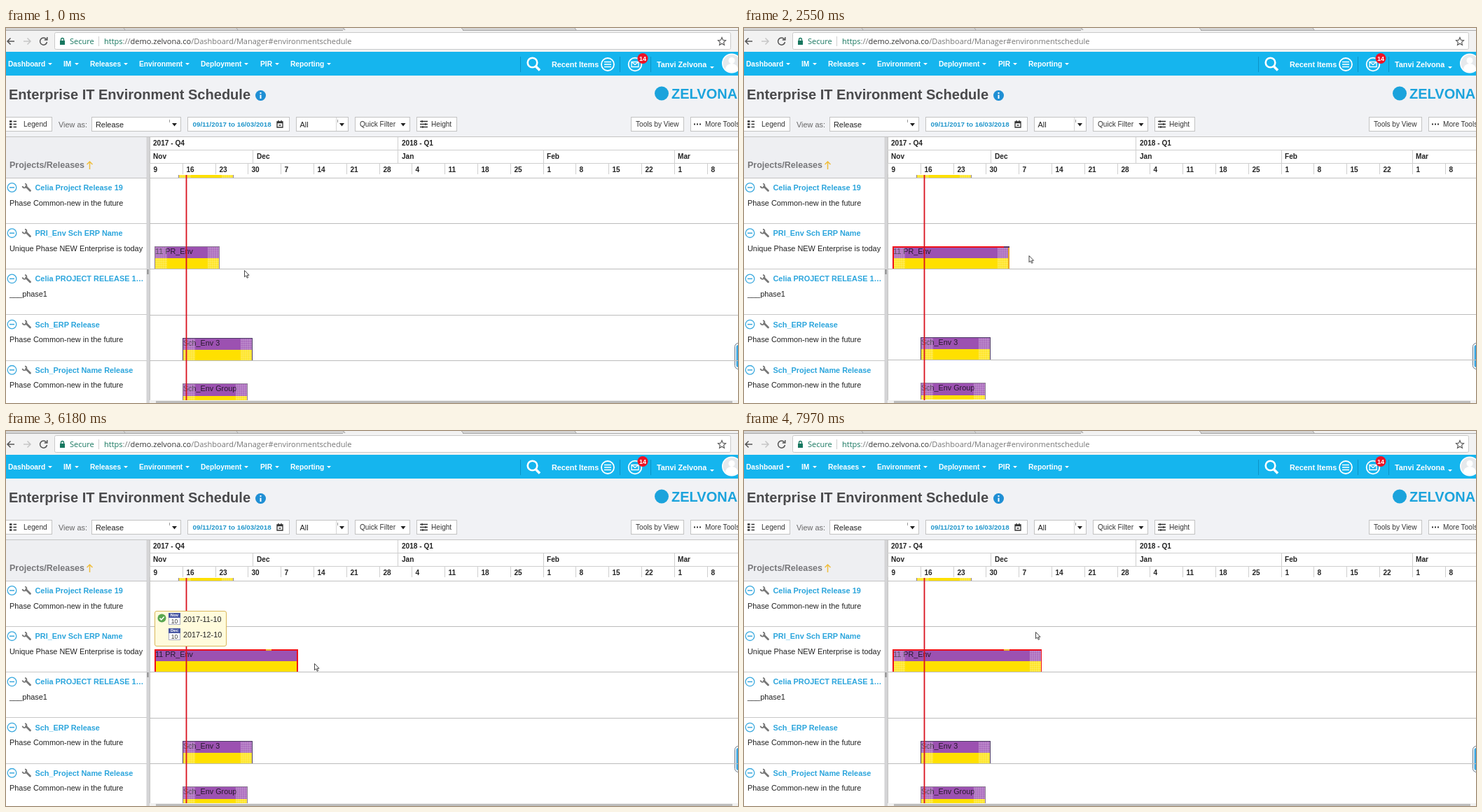
Write an HTML page that moves like this. It is 1045x536 px and loops after 8000 ms.

```html
<!DOCTYPE html>
<html lang="en">
<head>
<meta charset="utf-8">
<title>Environment Schedule</title>
<style>
html, body { margin: 0; width: 100%; height: 100%; overflow: hidden; background: #fff; }
body, text { font-family: "Liberation Sans", Arial, sans-serif; }
svg { position: absolute; left: 0; top: 0; overflow: visible; }
div, i, b { position: absolute; box-sizing: border-box; font-style: normal; }
.os { font: 11px "Open Sans", sans-serif; }
.t { font-size: 10.1px; fill: #333; }
.m { font-size: 10.9px; fill: #222; }
.bold { font-weight: bold; }
.nav { font-size: 10.2px; font-weight: bold; fill: #fff; }
.btn { fill: #fff; stroke: #c3c3c3; }
.rule { stroke: #cfcfcf; fill: none; }

.anim, .anim * { animation: 8s step-end infinite; }
.line { left: 205px; width: 840px; height: 1px; background: #bcbcbc; }
.bar { background: linear-gradient(#9c51b1 17.5px, #ffe000 0); font-size: 10.8px; line-height: 14px; color: #251a2b; white-space: nowrap; }
.bar span { position: absolute; left: 1px; top: 0; }
.end { top: 0; bottom: 0; left: 0; width: 18px;
  background: repeating-linear-gradient(#fff2 0 1px, #fff0 1px 3px), repeating-linear-gradient(90deg, #fff2 0 1px, #fff0 1px 3px), #ffffff2c; }
.end + .end { left: auto; right: 0; width: 17px; }
.edge { inset: 0; border: 1px solid #8d7d93; border-bottom: 0; }
.dark .edge { border-color: #4b3a63; }

#work { left: 212px; top: 312px; width: 93px; height: 32px; animation-name: grow; }
#work .end { animation-name: ends; }
#work .edge { animation-name: edge; }
#nub { left: 371px; top: 312px; width: 8px; height: 1.5px; background: #5a3a60; visibility: hidden; animation-name: nub; }
#low { inset: 0; animation-name: nudge; }

.tip { background: #fffbdc; border: 1px solid #d9b75a; border-radius: 3px; visibility: hidden; }
#range { left: 212px; top: 257px; width: 103px; height: 51px; animation-name: range; }
#day { left: 12px; top: 15px; width: 86px; height: 30px; box-shadow: 1px 1px 3px #0006; animation-name: day; }
.win { height: 20px; width: 82px; overflow: hidden; }
.reel { left: 0; top: 0; width: 82px; }
.date { position: relative; height: 20px; padding-left: 21px; font-size: 10.8px; line-height: 20px; color: #222; }
.date i { left: 0; top: 1.5px; width: 17px; height: 17px; background: #fff; border: 1px solid #a9abc4; font-size: 8.5px; line-height: 21px; text-align: center; color: #333; padding-top: 1px; }
.date b { left: -1px; top: -1px; width: 17px; height: 7px; background: #4a58a4; color: #fff; font-size: 6px; line-height: 7px; }
#ends { animation-name: ends-reel; }
#days { animation-name: days-reel; }

#cur { left: 0; top: 0; transform: translate(340px, 346px); animation-name: move; }
#arrow { animation-name: arrow; }
#size { visibility: hidden; animation-name: size; }

@keyframes move {
  0% { transform: translate(340px, 346px); }
  .875% { transform: translate(340px, 346px); animation-timing-function: steps(8, start); }
  8.3% { transform: translate(302px, 331px); }
  10.5% { transform: translate(302px, 330px); }
  11.375% { transform: translate(302px, 329px); }
  20.25% { transform: translate(302px, 329px); animation-timing-function: steps(4, start); }
  24.25% { transform: translate(375px, 330px); }
  28.125% { transform: translate(373px, 328px); }
  29% { transform: translate(373px, 328px); animation-timing-function: steps(8, start); }
  36.7% { transform: translate(440px, 322px); }
  68.875% { transform: translate(414.5px, 331.5px); }
  76.375% { transform: translate(424px, 331px); }
  77.25% { transform: translate(440px, 332px); }
  81.125% { transform: translate(440px, 332px); animation-timing-function: steps(5, start); }
  86.24% { transform: translate(542px, 370px); }
  86.25% { transform: translate(542px, 370px); animation-timing-function: steps(6, start); }
  91.8% { transform: translate(492px, 332px); }
  91.875% { transform: translate(491px, 332px); }
  95% { transform: translate(491px, 332px); animation-timing-function: steps(5, start); }
  99.62% { transform: translate(428px, 294px); }
  99.625%, 100% { transform: translate(416px, 287px); }
}
@keyframes arrow {
  0%, 28.125%, 76.375% { visibility: visible; }
  11.375%, 68.875% { visibility: hidden; }
}
@keyframes size {
  0%, 28.125%, 76.375% { visibility: hidden; }
  11.375%, 68.875% { visibility: visible; }
}
@keyframes grow {
  0% { width: 93px; }
  20.25% { width: 93px; animation-timing-function: steps(4, start); }
  24.25% { width: 166px; }
  30% { width: 167px; }
  68.875% { width: 205px; }
  82.1%, 100% { width: 213px; }
}
@keyframes ends {
  0%, 30%, 82.1%, 100% { opacity: 1; }
  18.25%, 68.875% { opacity: 0; }
}
@keyframes edge {
  0% { border-width: 1px 1px 0; border-color: #8d7d93; }
  18.25% { border-width: 2px 2px 0; border-color: #f01018; }
  30% { border-width: 2px 2px 0; border-color: #f01018 #e8a428 #f01018 #f01018; }
  68.875% { border-width: 2px 2px 0; border-color: #f01018; }
  82.1%, 100% { border-width: 2px 1px 0 2px; border-color: #f01018; }
}
@keyframes nub {
  0% { visibility: hidden; background: #5a3a60; }
  30% { visibility: visible; background: #5a3a60; }
  68.875%, 100% { visibility: visible; background: #f0b428; }
}
@keyframes nudge {
  0%, 34.8%, 89.9%, 100% { transform: none; }
  31%, 82.1% { transform: translateY(-1px); }
}
@keyframes range {
  0%, 30%, 82.1%, 100% { visibility: hidden; }
  18.25%, 68.875% { visibility: visible; }
}
@keyframes day {
  0%, 6.4%, 68.875%, 97%, 100% { visibility: hidden; }
  .875%, 32.8%, 86.25% { visibility: visible; }
}
@keyframes ends-reel {
  0% { transform: none; }
  20.25% { transform: translateY(-20px); }
  21.25% { transform: translateY(-40px); }
  22.25% { transform: translateY(-60px); }
  23.25% { transform: translateY(-80px); }
  68.875%, 100% { transform: translateY(-100px); }
}
@keyframes days-reel {
  0% { transform: none; }
  30% { transform: translateY(-20px); }
  80% { transform: translateY(-40px); }
  89%, 100% { transform: translateY(-60px); }
}
</style>
</head>
<body>
<svg id="page" width="1045" height="536">
  <!-- browser -->
  <rect width="1045" height="35" fill="#f2f2f2"/>
  <path d="M0 0H483L485 3H0zM650 0H812L815 3H652z" fill="#d3d3d3"/>
  <path d="M0 3.5H481M652 3.5H1045M168 0l2 3M329 0l2 3M481 0l3 3M650 0l3 3M812 0l2 3" stroke="#a9a9a9" fill="none"/>
  <rect x="69.5" y="6.5" width="965" height="24" rx="2" fill="#fff" stroke="#cacaca"/>
  <g fill="none" stroke="#555" stroke-width="1.5">
    <path d="M12 19H2M6.5 14.5L2 19l4.500 4.500"/>
    <path d="M25 19h10M30.500 14.500L35 19l-4.500 4.500" stroke="#c6c6c6"/>
    <path d="M57.500 16a5 5 0 1 0 1 4M58.800 13v4h-4"/>
    <path d="M1022 13.500l1.600 3.700 4 .4-3 2.700.9 4-3.500-2.100-3.500 2.100.9-4-3-2.700 4-.4z" stroke-width="1.100"/>
  </g>
  <path d="M77 18h7v6h-7z" fill="#17775f"/>
  <path d="M78.500 18v-1.500a2 2 0 0 1 4 0V18" fill="none" stroke="#17775f" stroke-width="1.300"/>
  <text class="os" x="91" y="23" fill="#17775f">Secure</text>
  <path d="M132.500 12v14" class="rule"/>
  <text class="os" x="140" y="23" fill="#777"><tspan fill="#17775f">https</tspan>://<tspan fill="#333">demo.zelvona.co</tspan>/Dashboard/Manager#environmentschedule</text>

  <!-- navigation -->
  <rect y="34" width="1045" height="34" fill="#15b5ee"/>
  <path d="M734.500 41v22M876.500 41v22M920.500 41v22" stroke="#0d93c6"/>
  <g fill="none" stroke="#fff">
    <circle cx="751.500" cy="49.500" r="6.800" stroke-width="2.600"/>
    <path d="M756.500 55l5.500 5.500" stroke-width="3.600"/>
    <circle cx="859" cy="52" r="9" stroke-width="1.800"/>
    <path d="M854 48.500h10M854 52h10M854 55.500h10" stroke-width="1.600"/>
    <circle cx="898" cy="52" r="9.300" stroke-width="1.800"/>
    <path d="M893 48.500h10v7h-10zl5 4 5-4" stroke-width="1.300"/>
  </g>
  <circle cx="909" cy="43.500" r="7.500" fill="#ee1226"/>
  <text x="909" y="46.800" text-anchor="middle" font-size="9" class="bold" fill="#fff">14</text>
  <text class="nav" x="779" y="55.500" style="font-size:10.8px">Recent Items</text>
  <text class="nav" x="929" y="55.500" style="font-size:10.8px">Tanvi Zelvona</text>
  <path d="M1005 55h6l-3 3z" fill="#fff"/>
  <circle cx="1036" cy="50.500" r="14" fill="#fff"/>
  <circle cx="1036" cy="50.500" r="12.500" fill="#e6e9ec"/>
  <path d="M1027 59a9 8 0 0 1 18 0a12.500 12.500 0 0 1-18 0z" fill="#fff"/>
  <circle cx="1036" cy="46.500" r="4.500" fill="#fff"/>

  <!-- title and tools -->
  <rect y="68" width="1045" height="87" fill="#f1f2f5"/>
  <text x="4" y="102.400" font-size="20.050" class="bold" fill="#4a4a4c">Enterprise IT Environment Schedule</text>
  <circle cx="363.500" cy="96.500" r="7.500" fill="#1f8fd4"/>
  <path d="M363.500 92v2M363.500 95.500v5.500" stroke="#fff" stroke-width="2"/>
  <circle cx="936" cy="93.500" r="10" fill="#1ba3dc"/>
  <text x="950" y="101" font-size="20" class="bold" fill="#1ba3dc">ZELVONA</text>
  <g class="btn">
    <rect x="-2.500" y="127.500" width="68" height="20"/>
    <rect x="122.500" y="127.500" width="127" height="20"/>
    <rect x="259.500" y="127.500" width="145" height="20"/>
    <rect x="414.500" y="127.500" width="74" height="20"/>
    <rect x="498.500" y="127.500" width="78" height="20"/>
    <rect x="586.500" y="127.500" width="57" height="20"/>
    <rect x="892.500" y="127.500" width="75" height="20"/>
    <rect x="977.500" y="127.500" width="80" height="20"/>
  </g>
  <path d="M471.500 128v19" stroke="#d6d6d6"/>
  <path d="M233.500 131v4M473.500 131v4" stroke="#999"/>
  <path d="M237 136h7l-3.500 4.500zM476 136h7l-3.500 4.500zM563.500 136h7l-3.500 4.500z" fill="#222"/>
  <path d="M5 133.500h3.500M5 137.500h3.500M5 141.500h3.500" stroke="#333" stroke-width="2.600"/>
  <path d="M10.500 133.500H15M10.500 137.500H15M10.500 141.500H15" stroke="#333" stroke-width="1.500"/>
  <path d="M387 134h8v8h-8zM387 135.500h8M389 132v2M393 132v2M389.500 139h3" stroke="#333" fill="none" stroke-width="1.300"/>
  <path d="M591 133.500h11M591 137.500h11M591 141.500h11M594 132v3M599 136v3M595 140v3" stroke="#333" stroke-width="1.300"/>
  <path d="M982 137.500h2M986 137.500h2M990 137.500h2" stroke="#333" stroke-width="2"/>
  <text class="t" x="25" y="141">Legend</text>
  <text class="m" x="75" y="141.500" style="fill:#666">View as:</text>
  <text class="m" x="128" y="141.500">Release</text>
  <text class="bold" x="266.500" y="141" font-size="9.800" fill="#2196cb">09/11/2017 to 16/03/2018</text>
  <text class="m" x="419.500" y="141.500">All</text>
  <text class="t" x="505" y="141">Quick Filter</text>
  <text class="t" x="607" y="141">Height</text>
  <text class="t" x="899" y="141">Tools by View</text>
  <text class="t" x="998" y="141">More Tools</text>

  <!-- schedule -->
  <rect y="155" width="201" height="59" fill="#eeeff2"/>
  <rect x="200.500" y="155" width="5" height="381" fill="#d4d4d6"/>
  <path d="M0 155.500H1045M205.500 155V536" stroke="#c4c4c4"/>
  <path d="M202.500 345v7" stroke="#888" stroke-width="2"/>
  <text class="bold" x="5" y="200" font-size="12.500" fill="#77777a">Projects/Releases</text>
  <path d="M119.500 202v-11M115.500 195l4-4 4 4" stroke="#f0bd3c" stroke-width="1.500" fill="none"/>
  <path class="rule" d="M205 174.500H1045M205 193.500H1045M559.500 156V193M352.500 175V193M767.500 175V193M954.500 175V193"/>
  <path d="M0 214.500H201M205 214.500H1045" stroke="#c2c2c2"/>
  <rect x="205" y="532" width="840" height="4" fill="#f1f1f1"/>
  <rect x="214" y="533" width="823" height="3" fill="#bdbdbd"/>
  <rect x="1040.500" y="450.500" width="12" height="37" rx="5" fill="#fff" stroke="#66788a"/>
  <rect x="1042.500" y="453" width="10" height="32" rx="3" fill="#3aa5e0"/>
</svg>

<div class="anim" style="inset:0">
  <i class="line" style="top:279px"></i>
  <i class="line" style="top:344px"></i>
  <div id="low">
    <i class="line" style="top:410px"></i>
    <i class="line" style="top:475px"></i>
    <div class="bar dark" style="left:252px;top:443px;width:100px;height:32px"><span>Sch_Env 3</span><i class="end"></i><i class="end"></i><i class="edge"></i></div>
    <div class="bar" style="left:252px;top:508px;width:93px;height:24px"><span>Sch_Env Group</span><i class="end"></i><i class="end"></i><i class="edge"></i></div>
  </div>
  <div class="bar" style="left:246px;top:209.5px;width:79px;height:4.500px;background:#ffe000"><i class="end"></i><i class="end"></i><i class="edge" style="border-top:0"></i></div>
  <div id="work" class="bar"><span>11 PR_Env</span><i class="end"></i><i class="end"></i><i class="edge"></i></div>
  <i id="nub"></i>
  <svg width="1045" height="536"><path d="M257.500 210V532" stroke="#d9121e" stroke-width="1.800"/></svg>
  <div id="range" class="tip">
    <svg width="20" height="20"><circle cx="9.500" cy="9.500" r="6" fill="#5aa750"/><path d="M6.500 9.500l2.200 2.300 4-4.300" fill="none" stroke="#fff" stroke-width="1.600"/></svg>
    <div class="win" style="left:19px;top:.5px"><div class="reel" data-dates="Nov 10"></div></div>
    <div class="win" style="left:19px;top:22.500px"><div class="reel" id="ends" data-dates="Nov 23,Nov 26,Nov 29,Dec 1,Dec 3,Dec 10"></div></div>
  </div>
  <div id="cur">
    <div id="day" class="tip"><div class="win" style="left:4px;top:3px"><div class="reel" id="days" data-dates="Nov 27,Dec 11,Dec 29,Dec 21"></div></div></div>
    <svg id="arrow" width="9" height="13"><path d="M.5 .5V9.800L2.700 7.900 4.200 11.300 5.700 10.600 4.200 7.300H7z" fill="#fff" stroke="#333" stroke-width=".9"/></svg>
    <svg id="size" width="1" height="1"><path d="M-6 0l3.500-3v2H-1v-2.500M-6 0l3.500 3v-2H-1v2.500M6 0L2.500-3v2H1v-2.500M6 0L2.500 3v-2H1v2.500" fill="#fff" stroke="#333" stroke-width=".9"/></svg>
  </div>
</div>

<script>
const page = document.getElementById('page');
const add = markup => page.insertAdjacentHTML('beforeend', markup);
const label = (cls, x, y, str, fill) =>
  add(`<text class="${cls}" x="${x}" y="${y}"${fill ? ` style="fill:${fill}"` : ''}>${str}</text>`);

// menu: text, left edge, caret centre
[['Dashboard', 3, 63], ['IM', 82, 101], ['Releases', 120, 171], ['Environment', 190, 259],
 ['Deployment', 278, 343], ['PIR', 363, 387], ['Reporting', 406, 461]].forEach(([str, x, c]) => {
  label('nav', x, 55, str);
  add(`<path d="M${c - 3} 50h6l-3 3z" fill="#fff"/>`);
});

// timeline header
label('t bold', 210, 168, '2017 - Q4', '#222');
label('t bold', 565, 168, '2018 - Q1', '#222');
[['Nov', 210], ['Dec', 358], ['Jan', 565], ['Feb', 772], ['Mar', 959]]
  .forEach(([str, x]) => label('t bold', x, 187, str, '#222'));
[9, 16, 23, 30, 7, 14, 21, 28, 4, 11, 18, 25, 1, 8, 15, 22, 1, 8].forEach((d, i) => {
  const x = Math.round(205 + 46.8 * i) + .5;
  label('t bold', x + 5, 206, d, '#222');
  add(`<path class="rule" d="M${x} 194V209"/>`);
});

// project rows
const soon = 'Phase Common-new in the future';
[['Celia Project Release 19', soon],
 ['PRI_Env Sch ERP Name', 'Unique Phase NEW Enterprise is today'],
 ['Celia PROJECT RELEASE 1…', '___phase1'],
 ['Sch_ERP Release', soon],
 ['Sch_Project Name Release', soon]].forEach(([name, phase], i) => {
  const y = 228 + 65.2 * i;
  label('m bold', 41.500, y + 4, name, '#2ba5dc');
  label('m', 5, y + 25.500, phase);
  add(`<g transform="translate(0 ${y})" fill="none">
    <circle cx="8.500" r="6.300" stroke="#3aa9de" stroke-width="1.300"/><path d="M5 0h7" stroke="#3aa9de" stroke-width="1.500"/>
    <path d="M28.500-1.500L34.500 4.500" stroke="#777" stroke-width="2.800" stroke-linecap="round"/>
    <path d="M27-5.500a3 3 0 1 1-3.500 3.500" stroke="#777" stroke-width="1.700"/></g>`);
  if (i < 4) add(`<path d="M0 ${Math.round(279 + 65.2 * i) + .5}H201" stroke="#c8c8c8"/>`);
});

// date reels
document.querySelectorAll('[data-dates]').forEach(reel => {
  reel.innerHTML = reel.dataset.dates.split(',').map(s => {
    const [mon, d] = s.split(' ');
    return `<div class="date"><i><b>${mon}</b>${d}</i>2017-${mon === 'Nov' ? 11 : 12}-${d.padStart(2, 0)}</div>`;
  }).join('');
});
</script>
</body>
</html>
```
